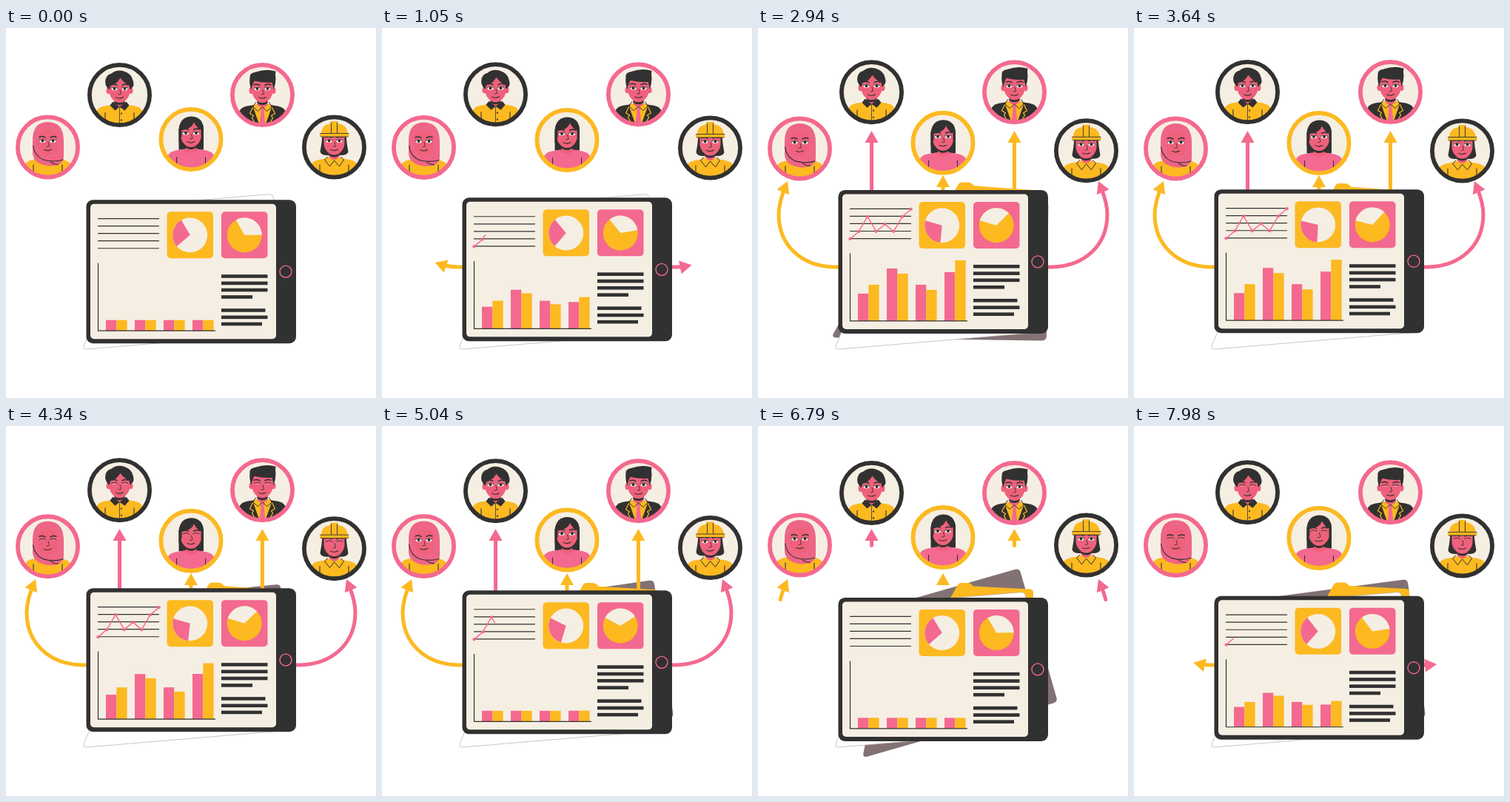
These frames come from a looping animation (500 px wide and 500 px high, 8000 ms). An HTML page:

```html
<!DOCTYPE html>
<html lang="en">
<head>
<meta charset="utf-8">
<title>Team dashboard</title>
<style>
html, body { margin: 0; width: 100%; height: 100%; overflow: hidden; background: #fff; }
svg { display: block; width: 100vw; height: 100vh; }
</style>
</head>
<body>
<svg id="stage" viewBox="0 0 500 500"></svg>
<script>
const DARK = '#323131', PINK = '#f4698f', YELLOW = '#fcb920', CREAM = '#f5eee3';
const SKIN = '#ef617b', SCARF = '#ef6585', GRAY = '#827274';
const LOOP = 8000, CYCLE = 7000, BLINK = 3640;
const stage = document.getElementById('stage');

function add(parent, tag, attrs = {}) {
  const el = document.createElementNS('http://www.w3.org/2000/svg', tag);
  for (const k in attrs) el.setAttribute(k, attrs[k]);
  parent.appendChild(el);
  return el;
}
const set = (el, k, v) => el.setAttribute(k, v);
const rect = (p, x, y, w, h, fill, rx = 0) => add(p, 'rect', { x, y, width: w, height: h, fill, rx });
const shape = (p, d, fill) => add(p, 'path', { d, fill });
const line = (p, d, stroke = DARK, width = 1.1) =>
  add(p, 'path', { d, fill: 'none', stroke, 'stroke-width': width, 'stroke-linecap': 'round', 'stroke-linejoin': 'round' });
const clamp = x => Math.max(0, Math.min(1, x));
const ramp = (t, a, b) => clamp((t - a) / (b - a));
const smooth = x => x * x * (3 - 2 * x);

// Linear interpolation through rows of [time, ...values]
function track(rows, t) {
  let i = 0;
  while (i < rows.length - 2 && t > rows[i + 1][0]) i++;
  const a = rows[i], b = rows[i + 1], k = ramp(t, a[0], b[0]);
  return a.slice(1).map((v, j) => v + (b[j + 1] - v) * k);
}

// ---- sheets behind the tablet, centred on 0,0
const SHEET = 'M-136 89L-112 42V-94H130Q136 -94 136 -88V88Q136 94 130 94H-131Q-138 94 -136 89Z';
const sheet = shape(stage, SHEET, GRAY);
const sheetKeys = [
  [0, 250, 329, 0, 1], [1300, 250, 328, 0, 1], [1700, 256, 331, 2.5, 1],
  [1960, 261, 336.5, 5.2, 1.01], [2940, 247, 326.5, 0.8, 1.06], [4340, 245, 321, -5.8, 1],
  [5670, 247, 320, -10.4, 1], [6850, 248.5, 320, -16.3, 1], [8000, 247, 318, -7.4, 1]
];
const folder = shape(stage, 'M-20 38L0 2Q1.500 -0.500 5 -0.500H15Q18 0 21 4L98 8Q102 8.500 102 13V88H-20Z', YELLOW);
const folderKeys = [
  [0, 0, 25, 0, 1], [900, 0, 25, 0, 1], [1960, 4, -14.5, 3, 1.07], [2940, 1, -3, 1, 1],
  [4340, 4, 0, 1, 1], [5670, 0, 1, 0, 1], [8000, 0, 0, 0, 1]
];
add(stage, 'path', {
  d: SHEET, fill: '#fff', stroke: '#b9aeaa', 'stroke-width': 0.7,
  transform: 'translate(233.3 329.3) rotate(-4.8)'
});

// ---- arrows
function arrow(d, color, start, end) {
  const g = add(stage, 'g');
  const path = line(g, d, color, 5);
  const head = add(g, 'polygon', { points: '0,0 -16,-9 -16,9', fill: color });
  return { g, path, head, start, end, len: path.getTotalLength() };
}
const arrows = [
  arrow('M112 323H103C58 322 28 293 28 252C28 240 31 228 40 207', YELLOW, 740, 2030),
  arrow('M388 323H397C442 322 472 293 472 252C472 240 469 228 460 207', PINK, 828, 2070),
  arrow('M153.500 270V139', PINK, 740, 2030),
  arrow('M346.500 270V139', YELLOW, 740, 2100),
  arrow('M250 270V199', YELLOW, 740, 2010)
];
function drawArrow(a, u) {
  const tip = a.len * ramp(u, a.start, a.end);
  const tail = a.len * ramp(u, 5585, 7040);
  set(a.g, 'visibility', u > a.start ? 'visible' : 'hidden');
  const p = a.path.getPointAtLength(tip), q = a.path.getPointAtLength(Math.max(0, tip - 8));
  const angle = tip > 0.5 ? Math.atan2(p.y - q.y, p.x - q.x) * 180 / Math.PI : 0;
  set(a.head, 'transform', `translate(${p.x} ${p.y}) rotate(${angle})`);
  set(a.path, 'stroke-dasharray', `${Math.max(0.01, tip - 13 - tail)} ${a.len * 2}`);
  set(a.path, 'stroke-dashoffset', -tail);
}

// ---- tablet, drawn with its top at y = 0
const tablet = add(stage, 'g');
rect(tablet, 108.5, 0, 283.5, 194, DARK, 9);
rect(tablet, 114, 5.5, 251, 182.5, CREAM, 5);
add(tablet, 'circle', { cx: 378, cy: 97, r: 8, fill: 'none', stroke: PINK, 'stroke-width': 1.3 });
for (let i = 0; i < 5; i++) line(tablet, `M124.500 ${25.4 + i * 10.05}H206.500`, DARK, 1.2);

function pie(x, card, disc, slice, from, to) {
  rect(tablet, x, 16, 62.5, 63, card, 5);
  const cx = x + 31.2, cy = 47.7, r = 23.5;
  add(tablet, 'circle', { cx, cy, r, fill: disc });
  const at = a => `${cx + r * Math.sin(a * Math.PI / 180)} ${cy - r * Math.cos(a * Math.PI / 180)}`;
  return { cx, cy, el: shape(tablet, `M${cx} ${cy}L${at(from)}A${r} ${r} 0 0 1 ${at(to)}Z`, slice) };
}
const pies = [pie(217.5, YELLOW, CREAM, PINK, 230, 330), pie(291, PINK, YELLOW, CREAM, 331, 450)];

[[101, 62.5], [110.4, 62.5], [119.6, 62.5], [129, 42], [147, 59.5], [156.4, 62.5], [165.5, 55]]
  .forEach(([y, w]) => rect(tablet, 291, y, w, 4.6, DARK));

const BASE = 177;
const bars = [37, 49, 71, 64, 49, 42, 66, 82].map((h, i) => ({
  h, late: i > 5,
  el: rect(tablet, 135 + (i >> 1) * 39 + (i % 2) * 14.3, 0, 14.3, 0, i % 2 ? YELLOW : PINK)
}));
line(tablet, `M124.500 86V${BASE}H282.500`, DARK, 1.2);

const points = [66, 56, 36, 56, 46, 56, 36, 26].map((y, i) => [124.5 + i * 11.75, y]);
const graph = line(tablet, 'M' + points.join('L'), PINK, 1.4);
const graphLen = graph.getTotalLength();
const dots = points.map(([cx, cy]) => add(tablet, 'circle', { cx, cy, r: 2.1, fill: PINK }));

// ---- people
const eyes = [];
function avatar(x, y, shift, ring, draw) {
  const g = add(stage, 'g');
  add(g, 'circle', { r: 41, fill: CREAM });
  const clip = add(stage, 'clipPath', { id: 'c' + x });
  add(clip, 'circle', { r: 40.5 });
  draw(add(g, 'g', { 'clip-path': `url(#c${x})` }));
  add(g, 'circle', { r: 40.6, fill: 'none', stroke: ring, 'stroke-width': 5.8 });
  return { g, x, y, shift };
}
function body(g, color, top = 14) {
  shape(g, `M-32 45V${top + 11}Q-31 ${top + 3} -21 ${top + 1}L-8 ${top - 1}H8L21 ${top + 1}Q31 ${top + 3} 32 ${top + 11}V45Z`, color);
}
function sleeves(g) {
  line(g, 'M-19.500 24V45M19.500 24V45');
}
function neck(g) {
  shape(g, 'M-7 2H7V13Q0 21 -7 13Z', SKIN);
  shape(g, 'M-7 6Q0 13 7 6V11Q0 16 -7 11Z', DARK);
}
function face(g) {
  shape(g, 'M-14 -24V-4Q-13 4 -6 9Q0 12 6 9Q13 4 14 -4V-24Z', SKIN);
}
function ears(g) {
  for (const cx of [-15, 15]) add(g, 'ellipse', { cx, cy: -6, rx: 3, ry: 4.5, fill: SKIN });
}
function features(g) {
  for (const x of [-7, 7]) {
    const eye = add(g, 'g');
    add(eye, 'ellipse', { rx: 3.9, ry: 2.5, fill: '#fff' });
    add(eye, 'circle', { r: 2, fill: DARK });
    eyes.push({ el: eye, x });
    line(g, `M${x - 4.2} -9.500Q${x} -12 ${x + 4.2} -9.500`, DARK, 0.9);
  }
  line(g, 'M-11.500 -13.500Q-8 -15.500 -3.500 -13M3.500 -13Q8 -15.500 11.500 -13.500', DARK, 1.5);
  line(g, 'M0.500 -7L2 -1.500Q0.500 0 -1.500 -0.800', DARK, 0.9);
  line(g, 'M-5 3.300Q0 6 5 3');
}

const people = [
  avatar(56.5, 161, 2, PINK, g => {
    body(g, YELLOW, 16);
    sleeves(g);
    shape(g, 'M-20.500 -8Q-21 -34 0 -34Q21.500 -34 21.500 -8V12Q22 20 14 24Q0 28 -13 21Q-20 17 -20.500 8Z', SCARF);
    shape(g, 'M-13.500 -12Q-12 -23 0 -23Q12 -23 13.500 -12V-3Q11 10 0 11Q-11 10 -13.500 -3Z', SKIN);
    features(g);
    line(g, 'M-20 -2Q-18 12 -6 17Q8 21 20.500 17M4 20Q9 24 14 23');
  }),
  avatar(153.5, 90.5, -4, DARK, g => {
    body(g, YELLOW);
    sleeves(g);
    neck(g);
    shape(g, 'M-9 9L-13 14L-6 21L0 16L7 21L13 14L9 9L0 16Z', DARK);
    line(g, 'M0 17V42', DARK, 0.8);
    for (const cy of [25, 34]) add(g, 'circle', { cx: 2.5, cy, r: 1.1, fill: DARK });
    ears(g);
    face(g);
    features(g);
    shape(g, 'M-14 -7Q-21 -13 -19 -21Q-17 -28 -11 -29Q-4 -35 6 -32Q16 -29 18 -20Q20 -14 18 -11L14 -7L13 -13Q6 -16 1 -23Q-5 -13 -12 -13Z', DARK);
  }),
  avatar(250, 150.5, 5, YELLOW, g => {
    shape(g, 'M-16.500 14V-13Q-15 -31 1 -31Q17 -30 17 -12V14Z', DARK);
    body(g, PINK);
    shape(g, 'M-11 13Q0 24 11 13Z', SKIN);
    sleeves(g);
    neck(g);
    face(g);
    features(g);
    shape(g, 'M-16.500 4V-14Q-14 -30 1 -30Q16 -29 17 -14V4L13.500 -4V-13Q8 -15 4 -23Q1 -14 -12.500 -12.500V-4Z', DARK);
  }),
  avatar(346.5, 90.5, -4, PINK, g => {
    body(g, DARK);
    shape(g, 'M-11 12L0 15L11 12L12 18L3.500 42H-3.500L-12 18Z', YELLOW);
    neck(g);
    shape(g, 'M-3 17H3L2 21L4 42H-4L-2 21Z', PINK);
    line(g, 'M-9 10L-13 16L-6 22L0 16L6 22L13 16L9 10', DARK, 1);
    line(g, 'M-13 17L-17 25L-12 28L-14 31L-8 42M13 17L17 25L12 28L14 31L8 42', YELLOW, 1.2);
    ears(g);
    face(g);
    features(g);
    shape(g, 'M-15 -7Q-18 -15 -17 -23Q-18 -30 -9 -31Q5 -36 18 -32Q17 -28 18 -22Q18 -14 15 -7L13 -17Q2 -16 -11 -19Q-14 -14 -15 -7Z', DARK);
  }),
  avatar(443.5, 161, 5, DARK, g => {
    shape(g, 'M-16 -16H16Q17 -4 19 6Q18 11 9 11H-9Q-18 11 -19 6Q-17 -4 -16 -16Z', DARK);
    body(g, YELLOW, 16);
    sleeves(g);
    neck(g);
    shape(g, 'M-9 13L-13 17L-6 26L0 18L7 26L13 17L9 13L0 18Z', YELLOW);
    line(g, 'M-9 13L-13 17L-6 26L0 18L7 26L13 17L9 13', DARK, 1);
    face(g);
    features(g);
    shape(g, 'M-17.500 -17Q-18 -30 -5 -32V-35H5V-32Q18 -30 18.500 -17Z', YELLOW);
    line(g, 'M-4 -33V-19M4 -33V-19', DARK, 0.9);
    rect(g, -19.5, -18.5, 39.5, 4.5, YELLOW, 1.5);
    line(g, 'M-19 -18.500H19.500M-18 -14H18.500', DARK, 0.9);
  })
];

// ---- one picture for a given time
function draw(t) {
  const u = t % CYCLE;
  const low = Math.pow((1 + Math.cos((u - 100) / CYCLE * 2 * Math.PI)) / 2, 1.2);
  const lift = 1 - low;

  const [cx, cy, angle, wide] = track(sheetKeys, t);
  set(sheet, 'transform', `translate(${cx} ${cy}) rotate(${angle}) scale(${wide} 1)`);
  const [dx, dy, turn, stretch] = track(folderKeys, t);
  set(folder, 'transform', `translate(${270 + dx} ${212 + dy}) rotate(${turn}) scale(${stretch} 1)`);

  arrows.forEach(a => drawArrow(a, u));
  set(tablet, 'transform', `translate(0 ${218.2 + 14 * low})`);
  pies.forEach(p => set(p.el, 'transform', `rotate(${-47 * lift} ${p.cx} ${p.cy})`));

  bars.forEach(b => {
    const up = b.late ? ramp(u, 650, 1550) : ramp(u, 500, 1390);
    const down = b.late ? ramp(u, 4170, 5070) : ramp(u, 4100, 5000);
    const h = 14.5 + (b.h - 14.5) * (smooth(up) - smooth(down));
    set(b.el, 'y', BASE - h);
    set(b.el, 'height', h);
  });

  const shown = ramp(u, 880, 1900) - ramp(u, 4400, 5400);
  set(graph, 'visibility', shown > 0 ? 'visible' : 'hidden');
  set(graph, 'stroke-dasharray', `${graphLen * shown} ${graphLen * 2}`);
  dots.forEach((d, i) => set(d, 'visibility', shown > 0 && shown >= i / 7 - 0.005 ? 'visible' : 'hidden'));

  people.forEach(p => set(p.g, 'transform', `translate(${p.x} ${p.y + p.shift * lift})`));
  const gap = Math.abs((t - 700 + BLINK * 1.5) % BLINK - BLINK / 2);
  const open = 0.07 + 0.93 * smooth(ramp(gap, 30, 160));
  eyes.forEach(e => set(e.el, 'transform', `translate(${e.x} -8.5) scale(1 ${open})`));
}

const start = performance.now();
function tick() {
  draw((performance.now() - start) % LOOP);
  requestAnimationFrame(tick);
}
tick();
</script>
</body>
</html>
```
